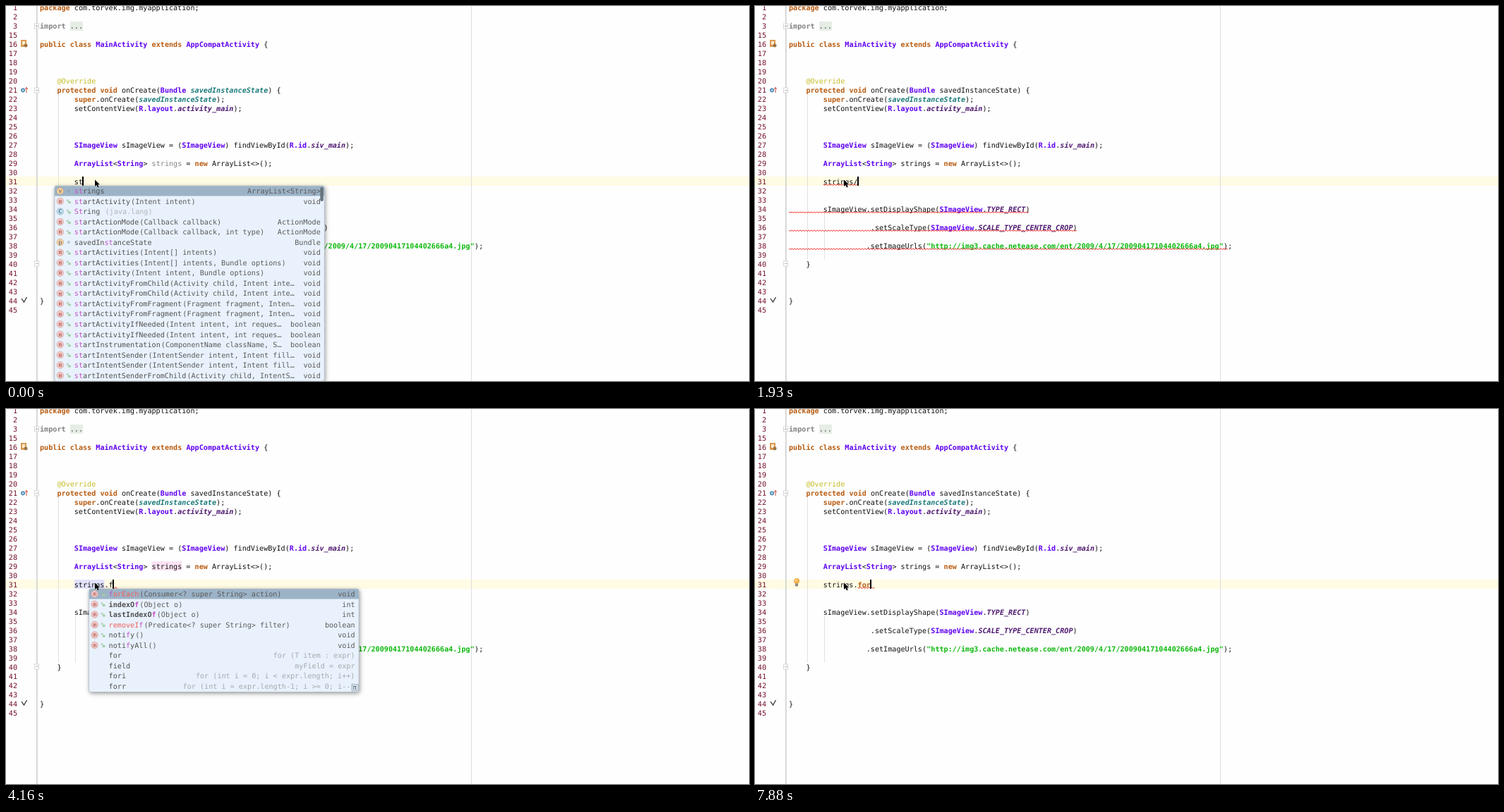
These frames come from a looping animation (1053x532 px, 8 s). An HTML page with a canvas:

```html
<!DOCTYPE html>
<html lang="en">
<head>
<meta charset="utf-8">
<title>Code completion</title>
<style>
  html, body { margin: 0; width: 100%; height: 100%; overflow: hidden; background: #fefefe; }
  canvas { display: block; width: 100vw; height: 100vh; }
</style>
</head>
<body>
<canvas id="stage" width="1053" height="532"></canvas>
<script>
const ctx = document.getElementById('stage').getContext('2d');
const LOOP = 8000, CHAR = 6.1, ROW = 13, BASE = 10.6, LEFT = 48, EDIT_ROW = 19, ITEM = 14.53;
const FAMILY = '"DejaVu Sans Mono", monospace';

const code = {
  0: 'package com.torvek.img.myapplication;',
  4: 'public class MainActivity extends AppCompatActivity {',
  8: '    @Override',
  9: '    protected void onCreate(Bundle savedInstanceState) {',
  10: '        super.onCreate(savedInstanceState);',
  11: '        setContentView(R.layout.activity_main);',
  15: '        SImageView sImageView = (SImageView) findViewById(R.id.siv_main);',
  17: '        ArrayList<String> strings = new ArrayList<>();',
  22: '        sImageView.setDisplayShape(SImageView.TYPE_RECT)',
  24: ' '.repeat(19) + '.setScaleType(SImageView.SCALE_TYPE_CENTER_CROP)',
  26: ' '.repeat(18) + '.setImageUrls("http://img3.cache.netease.com/ent/2009/4/17/20090417104402666a4.jpg");',
  28: '    }',
  32: '}'
};

// Each group of the pattern has the style of the same index.
const syntax = /(@\w+)|("[^"]*")|\b(package|public|class|extends|protected|void|super|new|for)\b|\b(MainActivity|AppCompatActivity|Bundle|SImageView|String|R\.(?:layout|id)|(?:(?<!new )ArrayList))\b|\b(activity_main|siv_main|TYPE_RECT|SCALE_TYPE_CENTER_CROP)\b|\b(savedInstanceState)\b/g;
const styles = [
  ['#c5bd28', ''], ['#0cb80c', 'bold'], ['#b85c12', 'bold'],
  ['#5f00f0', 'bold'], ['#4f1a70', 'italic bold'], ['#1d7b7b', 'italic bold']
];

const startList = `vstrings :: ArrayList<String>
mstartActivity(Intent intent) :: void
CString (java.lang)
mstartActionMode(Callback callback) :: ActionMode
mstartActionMode(Callback callback, int type) :: ActionMode
psavedInstanceState :: Bundle
mstartActivities(Intent[] intents) :: void
mstartActivities(Intent[] intents, Bundle options) :: void
mstartActivity(Intent intent, Bundle options) :: void
mstartActivityFromChild(Activity child, Intent inte… :: void
mstartActivityFromChild(Activity child, Intent inte… :: void
mstartActivityFromFragment(Fragment fragment, Inten… :: void
mstartActivityFromFragment(Fragment fragment, Inten… :: void
mstartActivityIfNeeded(Intent intent, int reques… :: boolean
mstartActivityIfNeeded(Intent intent, int reques… :: boolean
mstartInstrumentation(ComponentName className, S… :: boolean
mstartIntentSender(IntentSender intent, Intent fill… :: void
mstartIntentSender(IntentSender intent, Intent fill… :: void
mstartIntentSenderFromChild(Activity child, IntentS… :: void`.split('\n');

const stringList = `CString (java.lang)
vstrings :: ArrayList<String>
CStringTokenizer (java.util)
@StringDef (android.support.annotation)
@StringRes (android.support.annotation)
CStringBuffer (java.lang)
CStringBuilder (java.lang)
EStringIndexOutOfBoundsException (java.lang)
CStringCharacterIterator (java.text)
CStringReader (java.io)
CStringWriter (java.io)
CStringBuilderPrinter (android.util)
EStringPrepParseException (android.icu.text)
CStringSearch (android.icu.text)
IStringSplitter (android.text.TextUtils)
C!StringJoiner (java.util)
C~StringBufferInputStream (java.io)
mgetString(int resId) :: String
mgetString(int resId, Object... formatArgs) :: String`.split('\n');

const memberList = `m*add(String object) :: boolean
m*add(int index, String object) :: void
m*get(int index) :: String
m*size() :: int
m*addAll(Collection<? extends String> c) :: boolean
m*clear() :: void
m*contains(Object o) :: boolean
m!forEach(Consumer<? super String> action) :: void
m*indexOf(Object o) :: int
m*isEmpty() :: boolean
m*iterator() :: Iterator<String>
m*lastIndexOf(Object o) :: int
m*remove(int index) :: String
m*remove(Object o) :: boolean
m!removeIf(Predicate<? super String> filter) :: boolean
m*set(int index, String object) :: String
m*toArray() :: Object[]
m*toArray(T[] a) :: T[]
m*trimToSize() :: void`.split('\n');

const each = 'm!forEach(Consumer<? super String> action) :: void';
const plainFor = ' for :: for (T item : expr)';
const loops = [' fori :: for (int i = 0; i < expr.length; i++)',
  ' forr :: for (int i = expr.length-1; i >= 0; i--)'];
const fList = [each, 'm*indexOf(Object o) :: int', 'm*lastIndexOf(Object o) :: int',
  'm!removeIf(Predicate<? super String> filter) :: boolean', 'mnotify() :: void',
  'mnotifyAll() :: void', plainFor, ' field :: myField = expr', ...loops];

const loopText = 'for (String string : strings) {\n\n}';

// Every step changes only the listed parts of the state.
const steps = [
  [0, { text: 'st', list: startList, pick: 0, from: 0, scroll: true, unused: true, caret: true }],
  [300, { text: 'str', list: stringList, pick: 1, scroll: false }],
  [440, { text: 'stri' }],
  [590, { text: 'strin' }],
  [740, { text: 'string' }],
  [880, { text: 'strings', list: null }],
  [1330, { unused: false, markDecl: true, markUse: true, error: 'end' }],
  [1630, { text: 'strings/' }],
  [1930, { markDecl: false, markUse: false, error: 'all' }],
  [2530, { bulb: true }],
  [2670, { text: 'strings', bulb: false }],
  [2970, { markDecl: true, markUse: true, error: 'end' }],
  [3570, { bulb: true }],
  [3710, { text: 'strings.', bulb: false, list: memberList, pick: 0, from: 8 }],
  [4160, { text: 'strings.f', list: fList, pi: true }],
  [4310, { text: 'strings.fo', list: [each, plainFor, ...loops] }],
  [4600, { text: 'strings.for', list: [plainFor, each, ...loops] }],
  [5050, { listBulb: true }],
  [5350, { caret: false }],
  [5650, { text: loopText, list: null, markUse: false, error: '', caret: true, caretCol: 18 }],
  [5800, { frame: true }],
  [6390, { caret: false }],
  [6830, { frame: false, caret: true }],
  [6980, { text: 'strings.', caretCol: 0 }],
  [7130, { text: 'strings.for' }],
  [7430, { markDecl: false, error: 'word' }],
  [7880, { bulb: true }]
];

const colX = col => LEFT + col * CHAR;
const rowY = row => row * ROW - 5;

function rect(x, y, w, h, color) {
  ctx.fillStyle = color;
  ctx.fillRect(x, y, w, h);
}

function disc(x, y, r, color) {
  ctx.fillStyle = color;
  ctx.beginPath();
  ctx.arc(x, y, r, 0, 7);
  ctx.fill();
}

function ring(x, y, r, color) {
  ctx.strokeStyle = color;
  ctx.lineWidth = .8;
  ctx.beginPath();
  ctx.arc(x, y, r, 0, 7);
  ctx.stroke();
}

function path(points, color, width = 1) {
  ctx.strokeStyle = color;
  ctx.lineWidth = width;
  ctx.beginPath();
  points.forEach(([x, y]) => ctx.lineTo(x, y));
  ctx.stroke();
}

function write(s, x, y, color, font = '', size = 10.13) {
  ctx.font = `${font} ${size}px ${FAMILY}`;
  ctx.fillStyle = color;
  ctx.fillText(s, x, y);
}

function codeLine(text, row, plainParam) {
  const y = rowY(row) + BASE;
  let last = 0;
  const plain = end => write(text.slice(last, end), colX(last), y, '#111');
  for (const m of text.matchAll(syntax)) {
    plain(m.index);
    const kind = m.slice(1).findIndex(Boolean);
    const [color, font] = kind === 5 && plainParam ? ['#111', ''] : styles[kind];
    write(m[0], colX(m.index), y, color, font);
    last = m.index + m[0].length;
  }
  plain(text.length);
}

function squiggle(from, to, row) {
  const y = rowY(row) + 11.5, points = [];
  for (let x = colX(from), i = 0; x <= colX(to); x += 2, i++) points.push([x, y + (i % 2 ? 1 : -.5)]);
  path(points, '#f02020', .9);
}

function bulb(x, y) {
  disc(x, y - 1.5, 4, '#f3b04a');
  disc(x - 1, y - 2.5, 1.8, '#fad48c');
  rect(x - 2, y + 2, 4, 4, '#8d8a80');
}

function foldBox(y, plus) {
  rect(40.5, y - 3.5, 7, 7, '#fff');
  ctx.strokeStyle = '#d6d6d6';
  ctx.lineWidth = 1;
  ctx.strokeRect(40.5, y - 3.5, 6, 7);
  path([[42, y], [46, y]], '#bbb');
  if (plus) path([[43.5, y - 2], [43.5, y + 2]], '#bbb');
}

function gutter(shift) {
  rect(43, 0, 1.6, 532, '#d0d0d0');
  rect(659, 0, 1, 532, '#dedede');
  for (let r = 0; r <= 33 + shift; r++) {
    const n = String(r < 3 ? r + 1 : r + 12);
    write(n, 16 - n.length * CHAR, rowY(r) + BASE, '#74102a');
  }
  foldBox(28.5, true);
  foldBox(119.5);
  foldBox(rowY(28 + shift) + 6.5);

  rect(21, 48, 8, 10, '#d99a52');
  rect(23, 50, 4, 5, '#fbe9cf');
  disc(28, 56, 2.5, '#9c7446');
  disc(24, 119.5, 3, '#4f8fb8');
  disc(24, 119.5, 1.2, '#d5e8f2');
  path([[29, 123], [29, 115.5]], '#d04a3c');
  path([[27.3, 118], [29, 115.5], [30.7, 118]], '#d04a3c');
  const y = rowY(32 + shift) + 6;
  path([[22, y - 2], [25.5, y + 3], [29.5, y - 4]], '#333', 1.3);
}

function guides(shift) {
  ctx.setLineDash([1, 1]);
  path([[74.5, 126], [74.5, rowY(28 + shift)]], '#c4c4c4');
  path([[98.5, rowY(23 + shift)], [98.5, rowY(28 + shift)]], '#c4c4c4');
  ctx.setLineDash([]);
}

const iconColors = { m: '#f5c8c5', C: '#b9dcf0', E: '#b9dcf0', v: '#f5cd98', p: '#f5cfa5', '@': '#b0dcb6', I: '#b4e0ac' };

function icon(kind, x, y) {
  disc(x, y, 5, iconColors[kind]);
  ring(x, y, 4.9, 'rgba(90,80,80,.25)');
  if (kind === 'E') {
    path([[x + 1.5, y - 3.5], [x - 1.5, y], [x + 1.5, y], [x - 1, y + 3.5]], '#40586c');
  } else {
    write(kind, x - 2.4, y + 2.7, kind === 'm' ? '#9c4c4c' : '#4b5c66', '', 8);
  }
  if (kind === 'v' || kind === 'p') {
    ring(x + 12, y, 1.5, '#8795a0');
  } else {
    rect(x + 11, y, 4, 3, '#a4d0a8');
    path([[x + 9.5, y], [x + 9.5, y - 2], [x + 11.5, y - 2], [x + 11.5, y]], '#90bc98', .8);
  }
}

function item(line, x, right, mid, query) {
  const [, kind, flag, name, tail, type = ''] = line.match(/^(.)([*!~]?)(\w+)(.*?)(?: :: (.*))?$/);
  const y = mid + 3.6, isTemplate = kind === ' ', isPackage = tail.startsWith(' (');
  const color = flag === '!' ? '#f0605c' : '#505050', font = flag === '*' ? 'bold' : '';
  const put = (s, col, c, f) => write(s, x + col * CHAR, y, c, f);
  if (!isTemplate) icon(kind, x - 20, mid);
  const hit = isTemplate || !query ? -1 : name.toLowerCase().indexOf(query);
  if (hit < 0) put(name, 0, color, font);
  else {
    const end = hit + query.length;
    put(name.slice(0, hit), 0, color, font);
    put(name.slice(hit, end), hit, '#c050c6', font);
    put(name.slice(end), end, color, font);
  }
  // The tail is a label of its own, one pixel after the name.
  const tailX = x + name.length * CHAR + 1;
  write(tail, tailX, y, isPackage ? '#b0b4b8' : '#5a5a5a');
  write(type, right - type.length * CHAR, y, isTemplate ? '#a4a9ae' : '#5a5a5a');
  if (flag === '~') path([[x, mid + .5], [tailX + tail.length * CHAR, mid + .5]], '#777');
}

function popup(s) {
  const x = colX(8 + s.from), left = x - 28, top = 255, h = s.list.length * ITEM + 1;
  const query = s.text.slice(s.from);
  ctx.save();
  ctx.shadowColor = 'rgba(0,0,0,.45)';
  ctx.shadowBlur = 6;
  ctx.shadowOffsetX = 1;
  ctx.shadowOffsetY = 2;
  ctx.fillStyle = '#e9f2fc';
  ctx.beginPath();
  ctx.roundRect(left, top, 382.5, h, 3);
  ctx.fill();
  ctx.restore();
  ctx.save();
  ctx.clip();
  rect(left, top + s.pick * ITEM, 383, ITEM, '#9cb3c7');
  s.list.forEach((line, i) => item(line, x, left + 377, top + 7.5 + i * ITEM, query));
  ctx.restore();
  ctx.strokeStyle = '#b4bfca';
  ctx.lineWidth = .8;
  ctx.beginPath();
  ctx.roundRect(left, top + .3, 382.5, h, 3);
  ctx.stroke();
  if (s.scroll) {
    ctx.fillStyle = '#67737d';
    ctx.beginPath();
    ctx.roundRect(left + 376.5, 257, 4.5, 20, 2);
    ctx.fill();
  }
  if (s.pi) {
    const py = top + h - 11;
    rect(left + 372, py, 10, 10, '#dbe6f1');
    ctx.strokeStyle = '#8fa0b0';
    ctx.strokeRect(left + 372.5, py + .5, 9, 9);
    write('π', left + 374, py + 8, '#4a5560', '', 9);
  }
  if (s.listBulb) bulb(492.5, 262);
}

function pointer(x, y) {
  const shape = [[0, 0], [0, 9.5], [2.3, 7.6], [4, 11], [5.7, 10.2], [4.1, 7], [7, 6.8]];
  ctx.beginPath();
  shape.forEach(([dx, dy]) => ctx.lineTo(x + dx, y + dy));
  ctx.closePath();
  ctx.lineWidth = 1;
  ctx.strokeStyle = '#fff';
  ctx.stroke();
  ctx.fillStyle = '#000';
  ctx.fill();
}

function errors(s) {
  const end = 8 + s.text.length;
  if (s.error === 'end') squiggle(end, end + 1, EDIT_ROW);
  if (s.error === 'word') squiggle(16, end + 1, EDIT_ROW);
  if (s.error === 'all') {
    squiggle(8, end, EDIT_ROW);
    squiggle(0, 56, 22);
    squiggle(0, 67, 24);
    squiggle(0, 102, 26);
  }
}

function draw(s) {
  const typed = s.text.split('\n'), shift = typed.length - 1;
  rect(0, 0, 1053, 532, '#fefefe');
  rect(0, rowY(EDIT_ROW), 1053, ROW, '#fffbe4');
  gutter(shift);
  guides(shift);
  if (s.markDecl) rect(colX(26), rowY(17), 7 * CHAR, ROW, '#fbe3f3');
  if (s.markUse) rect(colX(8), rowY(EDIT_ROW), 7 * CHAR, ROW, '#e3e2fb');

  rect(91, 22, 18, 13, '#e6ede5');
  write('import', LEFT, rowY(2) + BASE, '#828282', 'bold');
  write('...', colX(7), rowY(2) + BASE, '#6f806f', 'bold');
  for (const key in code) {
    const row = +key;
    codeLine(code[key], row > EDIT_ROW ? row + shift : row, row === 9 && !s.unused);
  }
  if (s.unused) {
    rect(colX(26), rowY(17), 7 * CHAR, ROW, '#fefefe');
    write('strings', colX(26), rowY(17) + BASE, '#858585');
  }
  typed.forEach((line, i) => codeLine(' '.repeat(8) + line, EDIT_ROW + i));
  errors(s);
  if (s.frame) {
    ctx.strokeStyle = '#e04040';
    ctx.lineWidth = 1;
    ctx.strokeRect(colX(20) - .5, rowY(EDIT_ROW) + .5, 6 * CHAR + 1, ROW - 1);
  }
  if (s.caret) {
    const x = colX(8 + (s.caretCol || s.text.length));
    rect(Math.round(x) - 1, rowY(EDIT_ROW), 2, ROW, '#000');
  }
  if (s.bulb) bulb(59, 245.5);
  if (s.list) popup(s);
  pointer(126, 246.5);
}

function frame() {
  const t = performance.now() % LOOP;
  const state = {};
  for (const [at, change] of steps) if (at <= t) Object.assign(state, change);
  ctx.textRendering = 'geometricPrecision';
  draw(state);
  requestAnimationFrame(frame);
}
frame();
</script>
</body>
</html>
```
